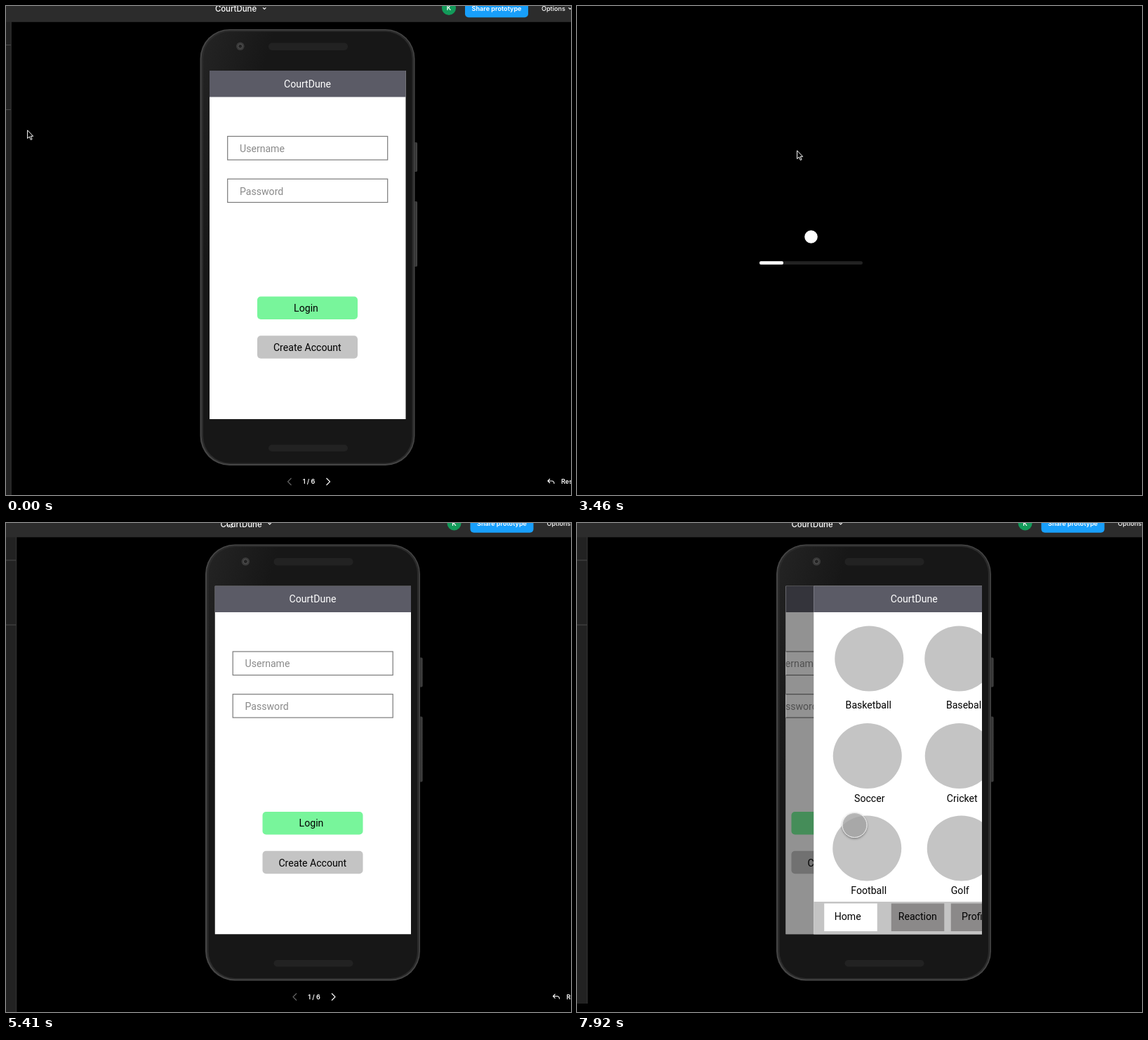
An HTML page for the animation above (8000 ms loop, 805 by 696 pixels).

```html
<!DOCTYPE html>
<html lang="en">
<head>
<meta charset="utf-8">
<title>Prototype preview</title>
<style>
  html, body { margin: 0; width: 100%; height: 100%; overflow: hidden; background: #000; }
  svg { display: block; }
  text { font-family: Roboto, sans-serif; font-size: 14.1px; }
  .ui text { font: 600 9.1px Inter, sans-serif; fill: #fff; }
  .ui .title { font-size: 11.4px; font-weight: 500; }
  .mid { text-anchor: middle; }
  .icon { fill: none; stroke: #fff; stroke-width: 1.1; }
  .field { fill: #fff; stroke: #7a7a7a; stroke-width: 1.2; }
  .hint { fill: #8a8a8a; }
  .rule { stroke: #4a4a4a; }
</style>
</head>
<body>
<svg id="stage" width="805" height="696" viewBox="0 0 805 696">
  <defs>
    <linearGradient id="body" x1="0" y1="0" x2=".5" y2=".3">
      <stop offset="0" stop-color="#242424"/>
      <stop offset=".5" stop-color="#171717"/>
    </linearGradient>
    <linearGradient id="key">
      <stop offset="0" stop-color="#222"/>
      <stop offset="1" stop-color="#484848"/>
    </linearGradient>
    <filter id="soft" x="-30%" y="-30%" width="160%" height="160%">
      <feDropShadow dx="0" dy="1.5" stdDeviation="1.5" flood-opacity=".45"/>
    </filter>
  </defs>
  <rect width="805" height="696"/>

  <g id="view">
    <g id="chrome" class="ui">
      <rect x="-245" y="20" width="252" height="690" fill="#222"/>
      <path class="rule" d="M-245 55.5H7M-245 147.5H7" />
      <path d="M7.2 22V710" stroke="#383838"/>
      <path class="icon" d="M-17 35l8 8m0-8l-8 8"/>
      <rect x="-245" y="-40" width="1150" height="62.8" fill="#2c2c2c"/>
      <text class="title mid" x="327.5" y="8">CourtDune</text>
      <path class="icon" d="M366 2.3l2.2 2.2 2.2-2.2"/>
      <circle cx="631" cy="3" r="10" fill="#139b5a"/>
      <text class="mid" x="631" y="6.4">K</text>
      <rect x="654" y="-14" width="90" height="30.3" rx="5" fill="#189ffb"/>
      <text class="mid" x="699" y="6.5">Share prototype</text>
      <text x="763" y="6.5" style="font-weight:500">Options</text>
      <path class="icon" d="M801.5 2.3l2.2 2.2 2.2-2.2"/>
      <g id="footer">
        <path class="icon" d="M406.5 672l-5 5 5 5" style="stroke:#666"/>
        <text class="mid" x="431.5" y="680">1 / 6</text>
        <path class="icon" d="M456.5 672l5 5-5 5"/>
        <path class="icon" d="M775 673l-3 3 3 3M772 676h5.500q3.500 0 3.500 4"/>
        <text x="791" y="680">Restart</text>
      </g>
      <rect id="strip" x="-245" y="686.500" width="1150" height="30"/>
    </g>

    <g id="phone">
      <path d="M581 194h3.500q1.500 0 1.500 2v38q0 2-1.500 2H581zM581 278h3.500q1.500 0 1.500 2v89q0 2-1.500 2H581z" fill="url(#key)"/>
      <rect x="276.500" y="33" width="306" height="621" rx="42" fill="#454545"/>
      <rect x="278.500" y="34.500" width="302.500" height="617.500" rx="40.500" fill="#2b2b2b"/>
      <rect x="281" y="36.500" width="297.500" height="614" rx="38" fill="url(#body)"/>
      <rect x="374" y="52.500" width="113" height="10.500" rx="5" fill="#222"/>
      <rect x="374" y="624.500" width="113" height="9.500" rx="4.700" fill="#222"/>
      <circle cx="333.800" cy="57.300" r="5.800" fill="#3a3a3a"/>
      <circle cx="333.800" cy="57.300" r="3" fill="#222" stroke="#555"/>
      <svg x="290" y="92" width="279.500" height="496">
        <g id="login">
          <rect width="360" height="496" fill="#fff"/>
          <rect width="360" height="37.500" fill="#5b5b66"/>
          <text class="mid" x="139.500" y="23.500" fill="#fff">CourtDune</text>
          <rect class="field" x="25.700" y="93.500" width="228" height="33.500"/>
          <text class="hint" x="43" y="115.800">Username</text>
          <rect class="field" x="25.700" y="154.200" width="228" height="33.300"/>
          <text class="hint" x="43" y="176.500">Password</text>
          <rect x="68" y="321.500" width="143" height="32.500" rx="5" fill="#78f59b"/>
          <text class="mid" x="137.500" y="342.500">Login</text>
          <rect x="68" y="377.300" width="143" height="32.500" rx="5" fill="#c4c4c4"/>
          <text class="mid" x="139.300" y="399">Create Account</text>
        </g>
        <rect id="dim" width="280" height="496"/>
        <g id="home"></g>
      </svg>
    </g>

    <g id="loader">
      <circle cx="280.500" cy="328.500" r="9.300" fill="#fff"/>
      <rect x="207" y="363.300" width="147" height="4.700" rx="2.300" fill="#222"/>
      <rect id="fill" x="207" y="363.300" height="4.700" rx="2" fill="#fff"/>
    </g>
  </g>

  <path id="arrow" d="M.6 .8V12.500L3.300 10 5.300 14.400 7.100 13.600 5.200 9.300H8.700Z" stroke="#fff" stroke-width="1"/>
  <g id="touch" filter="url(#soft)">
    <circle r="17.500" fill="#aaa" fill-opacity=".7" stroke="#eee" stroke-width="1"/>
  </g>
</svg>
<script>
const LOOP = 8000;
const el = {};
document.querySelectorAll('[id]').forEach(n => el[n.id] = n);

// Home screen: [label, ellipse x, ellipse y, label x, label y]
const sports = [
  ['Basketball', 79, 103.5, 78, 174], ['Baseball', 207, 103.5, 215.5, 174],
  ['Soccer', 76.5, 242, 79.5, 307.5], ['Cricket', 207.5, 242, 211.5, 307.5],
  ['Football', 76, 373.5, 78.5, 438.5], ['Golf', 210.5, 373.5, 208.5, 438.5]
];
// [label, box x, label x, colour]
const tabs = [
  ['Home', 15, 48.5, '#fff'], ['Reaction', 110.5, 148, '#8b8989'], ['Profile', 195.5, 231, '#8b8989']
];
const box = (x, y, w, h, fill) => `<rect x="${x}" y="${y}" width="${w}" height="${h}" fill="${fill}"/>`;
const label = (s, x, y, fill = '#000') => `<text class="mid" x="${x}" y="${y}" fill="${fill}">${s}</text>`;
el.home.innerHTML =
  box(0, 0, 280, 496, '#fff') + box(0, 0, 280, 37.5, '#5b5b66') + label('CourtDune', 143, 23.5, '#fff') +
  sports.map(([s, cx, cy, x, y]) =>
    `<ellipse cx="${cx}" cy="${cy}" rx="49" ry="46.5" fill="#c4c4c4"/>` + label(s, x, y)).join('') +
  box(0, 449.5, 280, 46.5, '#c4c4c4') +
  tabs.map(([s, x, tx, c]) => box(x, 452, 75.5, 39.5, c) + label(s, tx, 475.3)).join('');

// Key tables: [time, x, y]
const panKeys = [
  [2440, 0, 0], [2780, 53, 0], [4860, 53, 0], [5070, 28, -5],
  [5130, 28, -5], [5270, 13, -3.5], [5410, 7.5, -2.5]
];
const pointerKeys = [
  [0, 30, 176], [1300, 30, 172], [1370, 44, 172], [1440, 150, 240], [1510, 290, 360], [1580, 347, 404],
  [1850, 345, 402], [1950, 270, 350], [2180, 51, 243], [2250, 20, 235],
  [3050, 250, 310], [3200, 306, 285], [3460, 313, 205], [3530, 313, 205], [3780, 316, 60], [4060, 315, -8],
  [5560, 315, -8], [5700, 355, 110], [5880, 480, 330], [6050, 547, 465], [6130, 545, 483],
  [6360, 417, 433], [6440, 416, 432], [6640, 414.5, 427],
  [7510, 414.5, 427], [7710, 402, 429], [7920, 395.5, 430]
];
const fillKeys = [[2950, 14], [3200, 25], [3460, 34], [3530, 34], [4060, 55]];

function track(keys, t) {
  const i = keys.findIndex(k => k[0] > t);
  if (i === 0) return keys[0].slice(1);
  if (i < 0) return keys[keys.length - 1].slice(1);
  const a = keys[i - 1], b = keys[i];
  const u = (t - a[0]) / (b[0] - a[0]);
  return a.slice(1).map((v, j) => v + (b[j + 1] - v) * u);
}
const within = (t, a, b) => t >= a && t < b;
const show = (n, on) => n.setAttribute('visibility', on ? 'inherit' : 'hidden');
const move = (n, x, y) => n.setAttribute('transform', `translate(${x} ${y})`);

function draw(t) {
  const [px, py] = track(panKeys, t);
  move(el.view, px, py);
  show(el.chrome, !within(t, 2850, 4250));
  show(el.phone, !within(t, 2850, 4690));
  show(el.loader, within(t, 2950, 4110));
  show(el.strip, within(t, 1100, 2850) || t >= 7780);
  show(el.footer, t < 7780);
  el.fill.setAttribute('width', track(fillKeys, t)[0]);

  // Slide-in of the home screen, held on its last pose
  const u = Math.max(0, Math.min(t, 7920) - 7710) / 300;
  const p = 1 - Math.pow(1 - u, 1.62);
  move(el.login, -70 * p, 0);
  move(el.home, 279.5 * (1 - p), 0);
  el.dim.setAttribute('opacity', p / 2);
  show(el.home, p > 0);

  const [x, y] = track(pointerKeys, t);
  const on = t < 70 || within(t, 1370, 2250) || t >= 3050;
  const overScreen = !within(t, 2850, 4690) &&
    within(x - px, 290, 570) && within(y - py, 92, 588);
  move(el.arrow, x, y);
  move(el.touch, x, y);
  show(el.arrow, on && !overScreen);
  show(el.touch, on && overScreen);
}

const start = performance.now();
function tick() {
  draw((performance.now() - start) % LOOP);
  requestAnimationFrame(tick);
}
draw(0);
requestAnimationFrame(tick);
</script>
</body>
</html>
```
